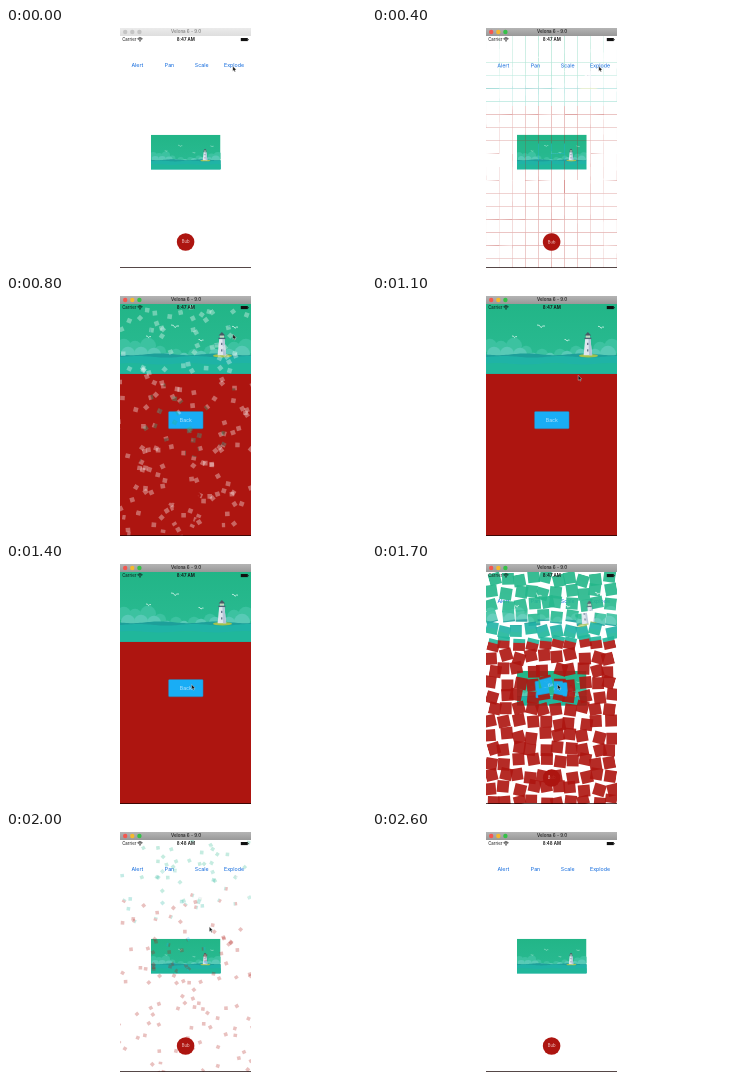
Write an HTML page with a canvas that moves like this. It is 360 px wide and 240 px high and loops after 2700 ms.

```html
<!DOCTYPE html>
<html lang="en">
<head>
<meta charset="utf-8">
<title>Explode transition</title>
<style>
  html, body { margin: 0; width: 100%; height: 100%; overflow: hidden; background: #fff; }
  canvas { display: block; width: 360px; height: 240px; }
</style>
</head>
<body>
<canvas id="stage"></canvas>
<script>
const LOOP = 2700, STEP = 100;
const FONT = 'Inter, Roboto, sans-serif';
const RED = '#ad1510';
const WIN = { x: 114, y: 8, w: 131, h: 232 };
const TILE = WIN.w / 10;
const BLAST = 700, SPREAD = 32;
const OPEN_AT = 385, CLOSE_AT = 1550;

const dpr = Math.max(1, window.devicePixelRatio || 1);

function makeCanvas(canvas, scale) {
  canvas.width = 360 * scale;
  canvas.height = 240 * scale;
  const g = canvas.getContext('2d');
  g.scale(scale, scale);
  g.imageSmoothingQuality = 'high';
  return g;
}

const ctx = makeCanvas(document.getElementById('stage'), dpr);

function rect(g, x, y, w, h, fill) {
  g.fillStyle = fill;
  g.fillRect(x, y, w, h);
}

function disc(g, x, y, r, fill) {
  g.fillStyle = fill;
  g.beginPath();
  g.arc(x, y, r, 0, Math.PI * 2);
  g.fill();
}

function poly(g, points, fill) {
  g.fillStyle = fill;
  g.beginPath();
  points.forEach(([x, y]) => g.lineTo(x, y));
  g.closePath();
  g.fill();
}

function label(g, text, x, y, size, fill, weight = 400, align = 'center') {
  g.font = `${weight} ${size}px ${FONT}`;
  g.textAlign = align;
  g.textBaseline = 'middle';
  g.fillStyle = fill;
  g.fillText(text, x, y);
}

function bird(g, x, y, s) {
  g.beginPath();
  g.moveTo(x - s, y - s * 0.35);
  g.quadraticCurveTo(x - s * 0.3, y - s * 0.5, x, y + s * 0.3);
  g.quadraticCurveTo(x + s * 0.4, y - s * 0.3, x + s, y - s * 0.1);
  g.strokeStyle = '#d8f7ec';
  g.lineWidth = 0.8;
  g.stroke();
}

function waves(g, y, amp, fill) {
  g.fillStyle = fill;
  g.beginPath();
  g.moveTo(0, 70);
  for (let x = 0; x <= 132; x += 2) g.lineTo(x, y + amp * Math.sin(x / 9 + y));
  g.lineTo(132, 70);
  g.fill();
}

// Seaside picture, laid out on 131 x 70 units
function seaside(g, x, y, w, h) {
  g.save();
  g.translate(x, y);
  g.scale(w / 131, h / 70);
  g.beginPath();
  g.rect(0, 0, 131, 70);
  g.clip();

  const sky = g.createLinearGradient(0, 0, 0, 52);
  sky.addColorStop(0, '#22b587');
  sky.addColorStop(1, '#29ba91');
  rect(g, 0, 0, 131, 70, sky);

  [[4, 42, 7], [15, 44, 7], [28, 42, 8], [40, 48, 6], [56, 51, 6], [74, 51, 6],
   [90, 48, 6], [114, 45, 7], [126, 43, 8]].forEach(c => disc(g, ...c, '#3cc2a0'));
  [[8, 50, 7], [21, 50, 7], [34, 51, 7], [47, 54, 5], [64, 54, 5], [81, 53, 6],
   [95, 51, 6], [109, 51, 6], [122, 50, 8]].forEach(c => disc(g, ...c, '#58cab6'));

  waves(g, 50.5, 0.9, '#1d9f9a');
  waves(g, 53, 0.8, '#1fb3a6');
  waves(g, 60, 0.7, '#20b79b');

  g.fillStyle = '#a3c24d';
  g.beginPath();
  g.ellipse(102.5, 52, 9.5, 1.7, 0, 0, Math.PI * 2);
  g.fill();
  poly(g, [[99.2, 35], [104.4, 35], [106.2, 51.5], [97.6, 51.5]], '#dfe6ee');
  poly(g, [[102.4, 35], [104.4, 35], [106.2, 51.5], [103, 51.5]], '#b5c4d8');
  rect(g, 98.4, 33.8, 7, 1.4, '#4f6477');
  rect(g, 99.8, 31.2, 4.2, 2.6, '#c4d6c0');
  poly(g, [[98.6, 31.6], [101.9, 28], [105.2, 31.6]], '#4a5a66');
  rect(g, 101, 39, 1.4, 2.2, '#66788f');
  rect(g, 101, 45.5, 1.4, 2.2, '#66788f');

  bird(g, 55, 22.5, 4);
  bird(g, 28.5, 33, 2.5);
  bird(g, 81, 36.5, 2.5);
  bird(g, 115, 23.5, 3);
  g.restore();
}

function home(g) {
  rect(g, WIN.x, WIN.y, WIN.w, WIN.h, '#fff');
  [['Alert', 131.3], ['Pan', 163.5], ['Scale', 195.7], ['Explode', 228]]
    .forEach(([text, x]) => label(g, text, x, 37.7, 5.3, '#0b66dc'));
  seaside(g, 145, 106.8, 69.5, 34.6);
  disc(g, 179.6, 214, 8.8, RED);
  label(g, 'Bub', 179.6, 214.2, 4.2, '#f3cfcd');
}

function detail(g) {
  rect(g, WIN.x, WIN.y, WIN.w, WIN.h, RED);
  seaside(g, WIN.x, WIN.y, WIN.w, 69.7);
  g.beginPath();
  g.roundRect(162.5, 115.5, 34.6, 17.3, 1);
  g.fillStyle = '#19adf5';
  g.fill();
  g.strokeStyle = '#3f6f98';
  g.lineWidth = 0.4;
  g.stroke();
  label(g, 'Back', 179.8, 124.4, 5.2, '#b9e3fc');
}

function snapshot(draw) {
  const canvas = document.createElement('canvas');
  const scale = dpr * 2;
  draw(makeCanvas(canvas, scale));
  return { canvas, scale };
}

// Repeatable values between -1 and 1
function seeded(seed) {
  return () => {
    seed = (seed + 0x6d2b79f5) | 0;
    let n = Math.imul(seed ^ (seed >>> 15), 1 | seed);
    n ^= n + Math.imul(n ^ (n >>> 7), 61 | n);
    return ((n ^ (n >>> 14)) >>> 0) / 2147483648 - 1;
  };
}

function easeInOut(t) {
  // cubic-bezier(.42, 0, .58, 1)
  let lo = 0, hi = 1;
  for (let i = 0; i < 24; i++) {
    const u = (lo + hi) / 2, v = 1 - u;
    if (3 * v * v * u * 0.42 + 3 * v * u * u * 0.58 + u * u * u < t) lo = u;
    else hi = u;
  }
  return lo * lo * (3 - 2 * lo);
}

// Breaks a snapshot into tiles that drift, spin, shrink and fade
function explode(g, { canvas, scale }, p, seed) {
  const rnd = seeded(seed);
  const size = 1 - 0.99 * p;
  g.globalAlpha = 1 - p;
  for (let y = WIN.y; y < 240; y += TILE) {
    const h = Math.min(TILE, 240 - y);
    for (let x = WIN.x; x < WIN.x + WIN.w - 1; x += TILE) {
      const dx = rnd() * SPREAD * p, dy = rnd() * SPREAD * p, turn = rnd() * Math.PI * p;
      g.save();
      g.translate(x + TILE / 2 + dx, y + h / 2 + dy);
      g.rotate(turn);
      g.scale(size, size);
      g.drawImage(canvas, x * scale, y * scale, TILE * scale, h * scale,
        -TILE / 2, -h / 2, TILE, h);
      g.restore();
    }
  }
  g.globalAlpha = 1;
}

function titleBar(g, active) {
  const fill = g.createLinearGradient(0, 0, 0, 8);
  fill.addColorStop(0, active ? '#b4b4b4' : '#ebebeb');
  fill.addColorStop(1, active ? '#989898' : '#dedede');
  rect(g, WIN.x, 0, WIN.w, 8, fill);
  const lights = active ? ['#f4574f', '#f5b92e', '#35c148'] : ['#c4c4c4', '#c4c4c4', '#c4c4c4'];
  lights.forEach((c, i) => disc(g, 119.2 + i * 7.1, 4, 2.2, c));
  label(g, 'Velona 6 - 9.0', 180, 4.1, 4.5, active ? '#1c1c1c' : '#7c7c7c', 500);
}

function statusBar(g, clock) {
  label(g, 'Carrier', 116.2, 11.6, 4.3, '#111', 400, 'left');
  g.strokeStyle = '#111';
  g.lineWidth = 0.7;
  [1.4, 2.6, 3.6].forEach(r => {
    g.beginPath();
    g.arc(134, 13.3, r, -Math.PI * 0.76, -Math.PI * 0.24);
    g.stroke();
  });
  disc(g, 134, 13, 0.6, '#111');
  label(g, clock, 179.8, 11.6, 4.4, '#111', 600);
  rect(g, 234.8, 10, 7, 3.1, '#111');
  rect(g, 242.1, 11, 0.6, 1.2, '#111');
}

const path = [[0, 226.8, 38.2], [850, 226.8, 38.2], [1350, 185.6, 120.5],
  [1800, 185.6, 120.5], [2350, 250, 27]];

function pointer(g, t) {
  let i = 0;
  while (i < path.length - 2 && t >= path[i + 1][0]) i++;
  const [t0, x0, y0] = path[i], [t1, x1, y1] = path[i + 1];
  const k = easeInOut(Math.min(1, (t - t0) / (t1 - t0)));
  g.save();
  g.translate(x0 + (x1 - x0) * k, y0 + (y1 - y0) * k);
  const arrow = [[0, 0], [0, 5], [1.1, 4], [1.9, 5.8], [2.7, 5.4], [2, 3.7], [3.5, 3.6]];
  poly(g, arrow, '#111');
  g.strokeStyle = '#fff';
  g.lineWidth = 0.35;
  g.stroke();
  g.restore();
}

const homeShot = snapshot(home), detailShot = snapshot(detail);

function draw(t) {
  const g = ctx;
  rect(g, 0, 0, 360, 240, '#fff');
  g.save();
  g.beginPath();
  g.rect(WIN.x, 0, WIN.w, 240);
  g.clip();

  const away = t >= OPEN_AT && t < CLOSE_AT;
  (away ? detail : home)(g);
  const age = t - (away ? OPEN_AT : CLOSE_AT);
  if (age >= 0 && age < BLAST) {
    explode(g, away ? homeShot : detailShot, easeInOut(age / BLAST), away ? 71 : 2903);
  }

  titleBar(g, t >= 100);
  statusBar(g, t < 1900 ? '8:47 AM' : '8:48 AM');
  rect(g, WIN.x, 239, WIN.w, 1, 'rgba(20, 0, 0, 0.72)');
  pointer(g, t);
  g.restore();
}

const start = performance.now();
let shown = -1;

function tick() {
  const t = Math.floor((performance.now() - start) % LOOP / STEP) * STEP;
  if (t !== shown) draw(shown = t);
  requestAnimationFrame(tick);
}
tick();
</script>
</body>
</html>
```
